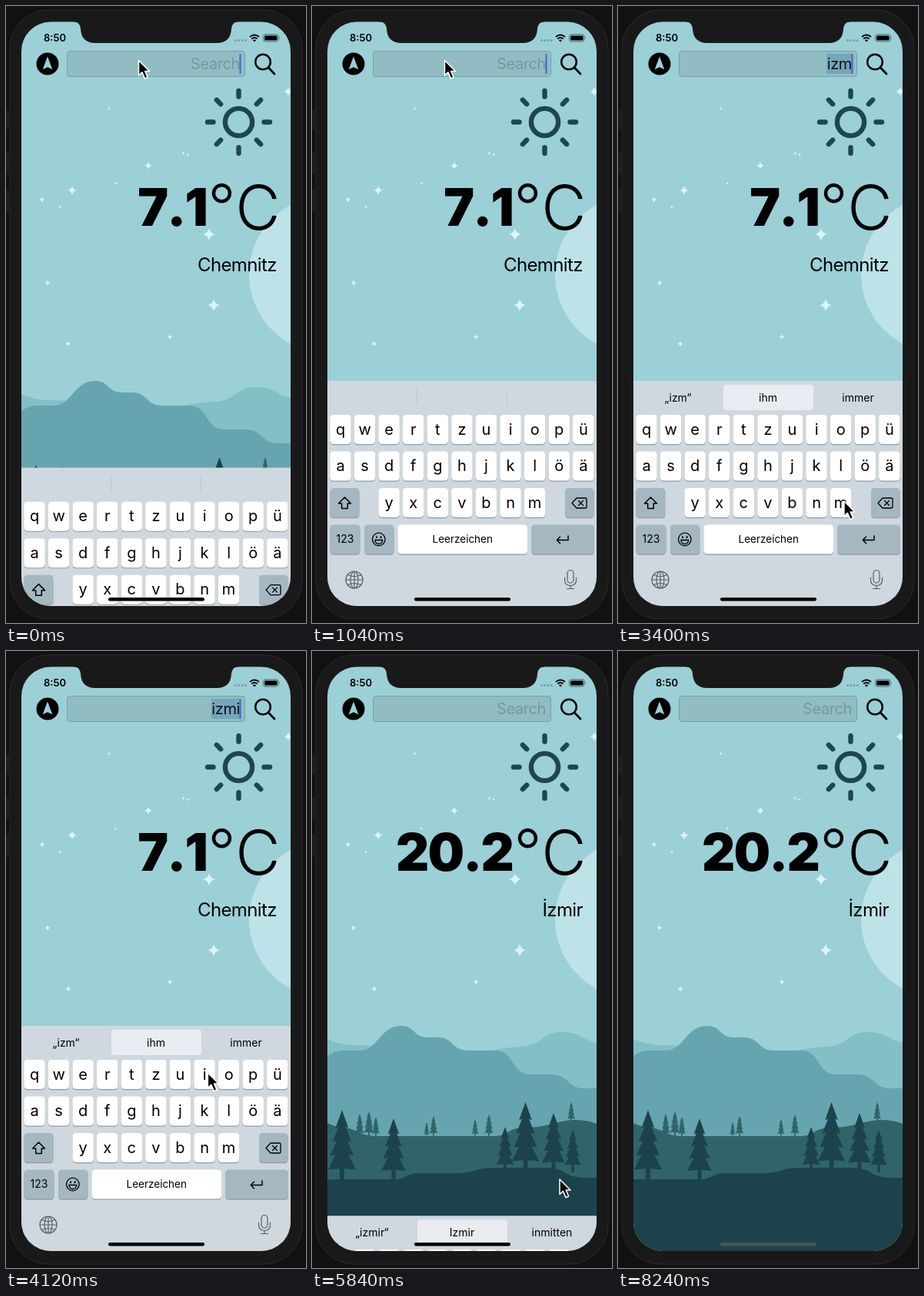
Write an HTML page that moves like this. It is 390 by 800 pixels and loops after 8.28 s.

```html
<!DOCTYPE html>
<html lang="de">
<head>
<meta charset="utf-8">
<title>Weather search</title>
<style>
html, body { margin: 0; width: 100%; height: 100%; overflow: hidden; background: #111; }
svg { display: block; width: 390px; height: 800px; font-family: Inter, Roboto, sans-serif; }
.line { fill: none; stroke: #000; stroke-linecap: round; stroke-linejoin: round; }
.end { text-anchor: end; }
.mid { text-anchor: middle; }
#temp { font: 900 67px Inter, Roboto, sans-serif; font-kerning: none; letter-spacing: -1.8px; }
</style>
</head>
<body>
<svg viewBox="0 0 390 800">
  <defs>
    <clipPath id="screen"><rect x="20" y="20.5" width="350" height="757.5" rx="38"/></clipPath>
  </defs>

  <rect width="390" height="800" fill="#111"/>
  <path stroke="#1d1d1d" stroke-width="8" d="M0 135V160M0 190V218M0 238V267"/>
  <rect x="5" y="5" width="380" height="790" rx="50" fill="#191919" stroke="#2b2b2b"/>

  <g clip-path="url(#screen)">
    <rect x="20" y="20" width="350" height="758" fill="#9bd0d6"/>
    <circle cx="418" cy="348" r="102" fill="#bde3e8"/>
    <g id="stars" fill="#dcf4f6"></g>

    <path fill="#83bfc6" d="M20 503Q36 511 58 511L90 512V600H20ZM234 518Q250 514 274 513C300 510 300 494 324 494C350 494 352 505 370 508V600H234Z"/>
    <path fill="#66a5b0" d="M20 525Q30 518 40 518H62C86 518 88 486 116 486C134 486 132 501 150 501H164C184 501 182 518 202 518H238C264 518 258 549 284 549H310C336 549 330 567 354 567H370V700H20Z"/>
    <path fill="#306469" d="M20 612Q30 617 42 618C58 619 62 629 84 629H238C256 629 252 619 276 618C306 618 318 609 340 608Q358 608 370 613V720H20Z"/>
    <g id="backTrees" fill="#306469"></g>
    <path fill="#1c434c" d="M20 685H108C122 685 122 677 140 677H188C212 677 214 670 234 670H306C328 670 330 683 354 683H370V780H20Z"/>
    <g id="frontTrees" fill="#1c434c"></g>

    <text x="49" y="46" font-size="13" font-weight="600">8:50</text>
    <path d="M298.5 44.5H312" stroke="#779fa5" stroke-width="3" stroke-linecap="round" stroke-dasharray="0 4.25"/>
    <path class="line" stroke-width="1.9" style="stroke-linecap:butt" d="M317 40Q323 34.8 329 40M319.2 42.6Q323 39.2 326.8 42.6"/>
    <path d="M320.9 44.4Q323 42.6 325.1 44.4L323 46.6Z"/>
    <rect x="334.5" y="37" width="19.5" height="9" rx="2.6" fill="none" stroke="#44656a"/>
    <rect x="336" y="38.4" width="16.5" height="6.2" rx="1.4"/>
    <path d="M355 40q1.6 1.5 0 3z" fill="#44656a"/>

    <circle cx="54" cy="75" r="14.5"/>
    <path fill="#9bd0d6" d="M54 65.5L60.3 82.2L54 79.2L47.7 82.2Z"/>

    <rect x="79.5" y="58.5" width="231" height="33" rx="3.5" fill="#91bdc2" stroke="#78a0a5"/>
    <rect id="mark" y="62" height="26" fill="#74a6bc"/>
    <text id="query" class="end" x="304" y="82" font-size="20" letter-spacing="-.4"></text>
    <rect id="caret" x="303.5" y="62" width="2" height="26" rx="1" fill="#4163dc"/>
    <circle class="line" cx="334" cy="72.5" r="9.8" stroke-width="2.5"/>
    <path class="line" stroke-width="2.8" d="M341.3 80L349 88"/>

    <g id="sun" transform="translate(302.5 150.5)" fill="none" stroke="#1f4650" stroke-width="6.4" stroke-linecap="round">
      <circle r="17.6"/>
    </g>
    <text id="temp" class="end" x="261" y="285"></text>
    <text class="mid" x="280.5" y="289" font-size="80" font-weight="300">°</text>
    <text class="end" x="356.5" y="289.5" font-size="80" font-weight="300">C</text>
    <text id="city" class="end" x="352" y="344" font-size="24" letter-spacing="-.6"></text>

    <g id="board"></g>
    <rect id="home" x="133" y="767" width="125" height="4.4" rx="2.2"/>
  </g>

  <path fill="#191919" d="M88 19v1.5q8 0 9 9q1 18.5 19 18.5H274q18 0 19 -18.5q1 -9 9 -9v-1.5Z"/>
  <path id="pointer" stroke="#fff" stroke-width="1.5" stroke-linejoin="round"
    d="M0 0V19.5L4.4 15.4L8 23.6L11.6 22L8.2 14H14Z"/>
</svg>

<script>
const LOOP = 8280, BOARD_TOP = 486, BOARD_H = 292;
const $ = id => document.getElementById(id);

function add(parent, tag, attrs, text) {
  const el = document.createElementNS('http://www.w3.org/2000/svg', tag);
  for (const k in attrs) el.setAttribute(k, attrs[k]);
  if (text) el.textContent = text;
  return parent.appendChild(el);
}

// Sky: the bright stars are placed, the specks are scattered
function star(x, y, r) {
  const c = r * .18;
  add($('stars'), 'path', {
    transform: `translate(${x} ${y})`,
    d: `M0 ${-r}Q${c} ${-c} ${r} 0Q${c} ${c} 0 ${r}Q${-c} ${c} ${-r} 0Q${-c} ${-c} 0 ${-r}Z`
  });
}
star(264, 296, 8);
star(270, 388, 8);
star(367, 111, 6);
star(86, 239, 6);
star(185, 207, 5);
for (const [x, y] of [[47, 251], [54, 359], [81, 438], [213, 429]]) star(x, y, 3.5);

let seed = 7;
const random = () => (seed = seed * 16807 % 2147483647) / 2147483647;
for (let i = 0; i < 5; i++) star(70 + 220 * random(), 95 + 180 * random(), 2);

for (let a = 0; a < 360; a += 45)
  add($('sun'), 'path', { d: 'M0 -33V-40.5', transform: `rotate(${a})` });

// Trees: four skirts that widen towards the ground, all scaled by height
function tree(parent, x, ground, h) {
  const right = [];
  for (let i = 1; i <= 4; i++) {
    const y = ground - h + h * (.06 + .2 * i), w = .2 * h * (i / 4) ** .55;
    right.push([w, y], [i < 4 ? w * .55 : h * .033, y - h * .015]);
  }
  right.push([h * .033, ground + 2]);
  const left = right.map(([dx, y]) => [x - dx, y]).reverse();
  const points = [[x, ground - h], ...right.map(([dx, y]) => [x + dx, y]), ...left];
  add(parent, 'polygon', { points: points.join(' ') });
}
const plant = (parent, ground, spots) => spots.forEach(([x, h]) => tree(parent, x, ground, h));
plant($('backTrees'), 629, [[62, 29], [74, 32], [83, 25], [149, 18], [158, 26], [212, 22], [230, 28]]);
plant($('backTrees'), 610, [[337, 25]]);
plant($('frontTrees'), 685, [[39, 90], [106, 79]]);
plant($('frontTrees'), 674, [[251, 57], [277.5, 89], [314, 75], [339, 53]]);

// Keyboard, drawn relative to its own top edge
const board = $('board'), GREY = '#a5b7c1';
const LETTERS = ['qwertzuiopü', 'asdfghjklöä', '  yxcvbnm'];
const rowY = r => 44 + 47.5 * r;
const colX = c => 23.3 + 31.58 * c;

add(board, 'rect', { x: 20, y: 0, width: 350, height: 300, fill: '#cfd8df' });
const dividers = add(board, 'path', { d: 'M136.5 10V31M253.5 10V31', stroke: '#bcc6cd' });
const pill = add(board, 'rect', { x: 137, y: 5, width: 117, height: 33, rx: 4, fill: '#e9ecf0' });
const hints = [-1, 0, 1].map(i =>
  add(board, 'text', { class: 'mid', x: 195 + 117 * i, y: 26.5, 'font-size': 14 }));

function key(x, row, w, fill, label, size) {
  const y = rowY(row), box = { x, y, width: w, height: 38, rx: 4.5 };
  add(board, 'rect', { ...box, y: y + 1.2, fill: '#929ca3' });
  add(board, 'rect', { ...box, fill });
  if (label) add(board, 'text', { class: 'mid', x: x + w / 2, y: y + 19 + size * .33, 'font-size': size }, label);
}
LETTERS.forEach((row, r) =>
  [...row].forEach((ch, c) => ch !== ' ' && key(colX(c), r, 27.4, '#fff', ch, 20)));
key(23.5, 2, 38, GREY);
key(329, 2, 37.5, GREY);
key(23.5, 3, 39, GREY, '123', 14);
key(68, 3, 38.5, GREY);
key(111.5, 3, 168.5, '#fff', 'Leerzeichen', 13.5);
key(285, 3, 82, GREY);

const icon = (d, width = 1.5, stroke = '#000') =>
  add(board, 'path', { class: 'line', d, 'stroke-width': width, style: `stroke:${stroke}` });
const DIM = '#566066';
icon('M42.5 151L50.5 159H46.3V165.5H38.7V159H34.5Z');
icon('M344 152H355Q357 152 357 154V163Q357 165 355 165H344L338 158.5ZM346.5 155.5L352.5 161.5M352.5 155.5L346.5 161.5', 1.3);
icon('M78.5 205.5a8.3 8.3 0 1 0 16.6 0a8.3 8.3 0 1 0 -16.6 0M81.8 206.5H91.8Q91 211.5 86.8 211.5Q82.6 211.5 81.8 206.5Z', 1.3);
icon('M84 202.3v1M89.6 202.3v1', 2);
icon('M333 201V206.5H318.5M322.5 202.3L318.3 206.5L322.5 210.7');
icon('M44 258a11 11 0 1 0 22 0a11 11 0 1 0 -22 0M50 258a5 11 0 1 0 10 0a5 11 0 1 0 -10 0' +
     'M55 247V269M44 258H66M46.5 251.5Q55 255.5 63.5 251.5M46.5 264.5Q55 260.5 63.5 264.5', 1.2, DIM);
icon('M332 249.5a4 4 0 0 1 8 0V258a4 4 0 0 1 -8 0ZM328.5 255V258Q328.5 265.5 336 265.5Q343.5 265.5 343.5 258V255M336 265.5V269.5M331.5 269.5H340.5', 1.2, DIM);

// Timeline in ms: each letter is pressed, then return closes the keyboard
const WORD = 'izmir', PRESSES = [2100, 2560, 3300, 4080, 4960];
const PROPOSALS = [['I', 'ich'], ['in', 'ist'], ['ihm', 'immer'], ['Izmir', 'inmitten'], ['Izmir', 'inmitten']];
const CLOSE = 5680, RESULT = 5800, SLIDE = 400, LEAD = 92, HINT_LAG = 100;
const HOLD = 180, EARLY = 40;

function keyTip(ch) {
  const r = LETTERS.findIndex(row => row.includes(ch));
  return [colX(LETTERS[r].indexOf(ch)) + 18, BOARD_TOP + rowY(r) + 17];
}
const stops = [
  [1060, 172.5, 70.5],
  ...PRESSES.map((t, i) => [t, ...keyTip(WORD[i])]),
  [CLOSE, 322, 685],
  [6500, 400, 770]
];

const clamp = v => Math.max(0, Math.min(1, v));
const settle = u => 1 - (1 - clamp(u)) ** 3.6;
const pressed = t => PRESSES.filter(p => p <= t).length;

function pointerAt(t) {
  let [, x, y] = stops[0];
  for (let i = 1; i < stops.length; i++) {
    const from = stops[i - 1][0] + HOLD, to = stops[i][0] - EARLY;
    const u = clamp((t - from) / (to - from)), e = u * u * (3 - 2 * u);
    x += (stops[i][1] - x) * e;
    y += (stops[i][2] - y) * e;
  }
  return [x, y];
}

function setText(el, s) {
  if (el.textContent !== s) el.textContent = s;
}

function draw(t) {
  const open = t < CLOSE;
  const typed = open ? WORD.slice(0, pressed(t)) : '', query = $('query');
  setText(query, typed || 'Search');
  query.setAttribute('fill', typed ? '#111' : '#719a9f');
  const w = typed ? query.getComputedTextLength() + 1 : 0;
  $('mark').setAttribute('x', 304.5 - w);
  $('mark').setAttribute('width', w);

  const lit = typed || t % 1000 < 560;
  $('caret').setAttribute('opacity', open && lit ? 1 : 0);

  const done = t >= RESULT;
  setText($('temp'), done ? '20.2' : '7.1');
  setText($('city'), done ? 'İzmir' : 'Chemnitz');

  const n = pressed(t - HINT_LAG);
  const words = n ? [`„${WORD.slice(0, n)}“`, ...PROPOSALS[n - 1]] : ['', '', ''];
  hints.forEach((el, i) => setText(el, words[i]));
  pill.setAttribute('opacity', n ? 1 : 0);
  dividers.setAttribute('opacity', n ? 0 : 1);

  const hidden = open ? 1 - settle((t + LEAD) / SLIDE) : settle((t - CLOSE) / SLIDE);
  board.setAttribute('transform', `translate(0 ${BOARD_TOP + BOARD_H * hidden})`);

  const f = clamp((t - 5900) / 250);
  $('home').setAttribute('fill', `rgb(${76 * f},${83 * f},${88 * f})`);
  $('pointer').setAttribute('transform', `translate(${pointerAt(t)})`);
}

const start = performance.now();
function frame() {
  draw((performance.now() - start) % LOOP);
  requestAnimationFrame(frame);
}
frame();
</script>
</body>
</html>
```
